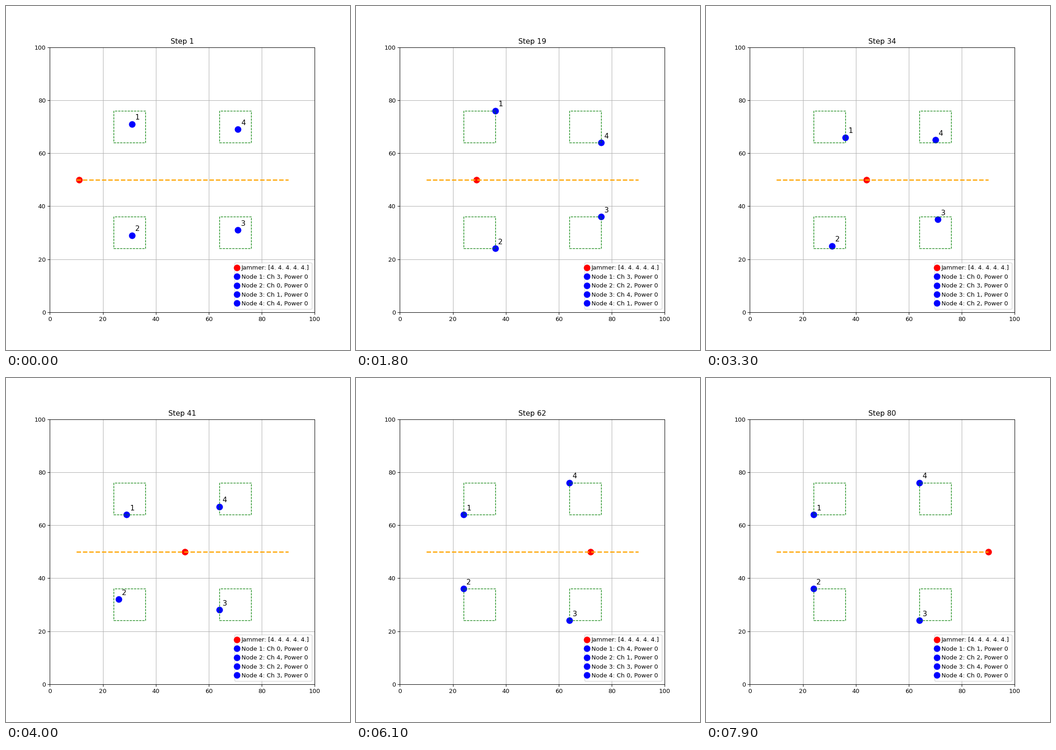
A matplotlib script that plays this animation: 748 px wide and 748 px high, repeating every 8 s.

```python
import numpy as np
import matplotlib.pyplot as plt
from matplotlib.animation import FuncAnimation

STEPS = 80
HALF = 6
ROUND = 9  # steps between channel hops
CENTERS = [(30, 70), (30, 30), (70, 30), (70, 70)]

# Per node and axis: first direction, step of turning back, duration, easing power.
GLIDES = [
    ((1, 34, 12, 1), (1, 24, 12, 1)),
    ((1, 26, 18, 1), (-1, 33, 12, 1)),
    ((1, 29, 12, 1), (1, 33, 12, 1)),
    ((1, 28, 12, 1), (-1, 20, 42, 2)),
]

START_CHANNELS = [3, 0, 1, 4]
HOPS = "32 4324 31 2431 243 214 3 - 213".split(" ")  # nodes hopping in each round


def glide(step, sign, start, duration, power):
    """Offset that runs to one side of the box, then crosses to the other."""
    t = np.clip((step - start) / duration, 0, 1)
    return sign * (min(step, HALF) - round(2 * HALF * t ** power))


def node_position(i, step):
    return [c + glide(step, *g) for c, g in zip(CENTERS[i], GLIDES[i])]


def channels_at(step):
    """Each hopping node takes the one channel that is free."""
    channels = START_CHANNELS.copy()
    for node in "".join(HOPS[:(step + 4) // ROUND]).replace("-", ""):
        channels[int(node) - 1] = (set(range(5)) - set(channels)).pop()
    return channels


def node_label(i, channel):
    return f"Node {i + 1}: Ch {channel}, Power 0"


fig, ax = plt.subplots(figsize=(8, 8), dpi=93.5)
ax.set(xlim=(0, 100), ylim=(0, 100), aspect="equal")
ax.grid(True)
title = ax.set_title("Step 1")

jammer, = ax.plot([11], [50], "ro", markersize=10, label="Jammer: [4. 4. 4. 4. 4.]")
nodes, tags = [], []
for i, center in enumerate(CENTERS):
    nodes += ax.plot(*[[c] for c in center], "bo", markersize=10,
                     label=node_label(i, START_CHANNELS[i]))
    tags.append(ax.annotate(str(i + 1), center, xytext=(5, 5), fontsize=12,
                            textcoords="offset points", va="bottom"))

box = HALF * np.array([(-1, -1), (1, -1), (1, 1), (-1, 1), (-1, -1)])
for center in CENTERS:
    ax.plot(*(box + center).T, color="green", ls="--", lw=1)
ax.plot([10, 90], [50, 50], color="orange", ls="--", lw=2)
legend = ax.legend(loc="lower right", handlelength=0)
rows = legend.get_texts()[1:]


def update(frame):
    step = frame + 1
    title.set_text(f"Step {step}")
    jammer.set_data([10 + step], [50])
    for i, channel in enumerate(channels_at(step)):
        x, y = node_position(i, step)
        nodes[i].set_data([x], [y])
        tags[i].xy = (x, y)
        rows[i].set_text(node_label(i, channel))
    return [title, jammer, *nodes, *tags, *rows]


anim = FuncAnimation(fig, update, frames=STEPS, interval=100, repeat=True,
                     repeat_delay=0, blit=False)
plt.show()
```
